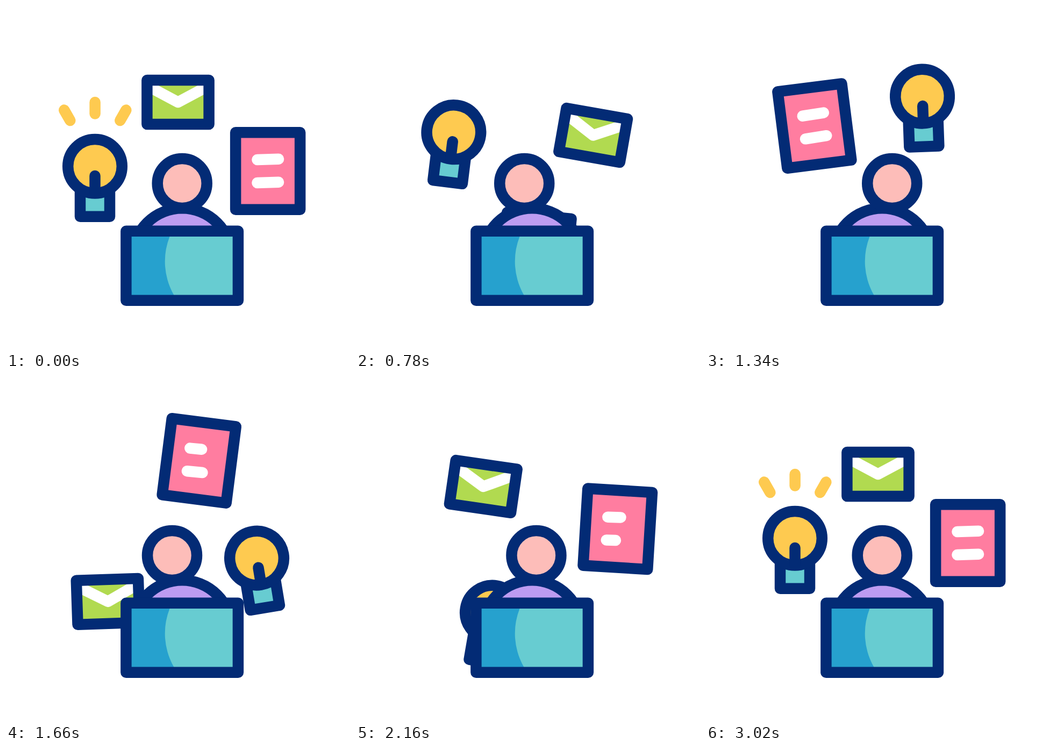
Animation, 640 px wide and 640 px high, one loop 3.42 s. Source, as an HTML page:

```html
<!DOCTYPE html>
<html lang="en">
<head>
<meta charset="utf-8">
<title>Juggling tasks</title>
<style>
  html, body { margin: 0; width: 100%; height: 100%; overflow: hidden; background: #fff; }
  svg { display: block; width: 100vw; height: 100vh; }
  .o { stroke: #032b75; }
  .w { stroke: #fff; }
  .y { stroke: #feca50; }
</style>
</head>
<body>
<svg viewBox="0 0 640 640" fill="none" stroke-width="20.5" stroke-linejoin="round">
  <g stroke-linecap="round">
    <path class="y ray" pathLength="1" d="M119.3 213L108.2 193.6"/>
    <path class="y ray" pathLength="1" d="M165.6 200.5V179"/>
    <path class="y ray" pathLength="1" d="M212.3 213L223.4 193.6"/>
  </g>

  <g id="mail">
    <rect x="-57.6" y="-41" width="115.2" height="82" fill="#b1da50"/>
    <path class="w" d="M-57.6 -30.8L0 0L57.6 -30.8"/>
    <rect class="o" x="-57.6" y="-41" width="115.2" height="82"/>
  </g>

  <g id="page" stroke-linecap="round">
    <rect class="o" x="-60" y="-71.7" width="120" height="143.4" fill="#ff7da0"/>
    <path class="w row" pathLength="1" d="M-19.7 -21L19.9 -22.2"/>
    <path class="w row" pathLength="1" d="M-19.7 22L19.9 20.8"/>
  </g>

  <g id="bulb" class="o" stroke-linecap="round">
    <rect x="-27.5" y="22" width="55" height="49.7" fill="#67ccd1"/>
    <circle cy="-21.8" r="50.3" fill="#feca50"/>
    <path d="M0 -4V26"/>
  </g>

  <path class="o" d="M235.7 468.3A92 92 0 0 1 419.7 468.3" fill="#bd9cf1"/>
  <circle id="head" class="o" cx="327.7" cy="330" r="46" fill="#fdbdb9"/>

  <rect x="223.4" y="418.8" width="208.5" height="129" fill="#67ccd1"/>
  <path d="M224 429H304.5A126 126 0 0 0 312.5 538H224Z" fill="#26a1ce"/>
  <rect class="o" x="223.4" y="418.8" width="208.5" height="129"/>
</svg>
<script>
const LOOP = 3420, TURN = 2400, RING = 154.5;
const get = id => document.getElementById(id);
const rays = document.querySelectorAll('.ray');
const rows = document.querySelectorAll('.row');

// start delay, start angle, centre offset from the ring point, squash of the ring
const items = [
  { el: get('page'), delay: 0, from: 0.55, dx: 12.7, dy: -14.5, squash: 2.5 },
  { el: get('mail'), delay: 200, from: -90, dx: 0, dy: 13.5, squash: 0 },
  { el: get('bulb'), delay: 400, from: 180, dx: 0, dy: 0, squash: 0 }
];

const ease = (t, a, b) => {
  const s = Math.min(1, Math.max(0, (t - a) / (b - a)));
  return s * s * (3 - 2 * s);
};

// eased values, one every 600 ms
const swing = (t, keys) => keys.slice(1).reduce(
  (v, k, i) => v + (k - keys[i]) * ease(t, i * 600, i * 600 + 600), keys[0]);

function trim(el, k) {
  el.setAttribute('stroke-dasharray', `${k} 3`);
  el.setAttribute('visibility', k > 0.001 ? 'visible' : 'hidden');
}

function place({ el, delay, from, dx, dy, squash }, time) {
  const t = time - delay;
  const a = (from + 360 * ease(t, 0, TURN)) * Math.PI / 180;
  const r = RING - squash * Math.sin(2 * a);
  const x = 320 + r * Math.cos(a), y = 320 + r * Math.sin(a);
  const tilt = swing(t, [0, 10, -10, 10, 0]);
  el.setAttribute('transform', `translate(${x} ${y}) rotate(${tilt}) translate(${dx} ${dy})`);
}

function rowLength(t) {
  if (t < 0 || t > TURN) return 1;
  const u = t % 1200;
  return 1 - 0.84 * (ease(u, 200, 700) - ease(u, 700, 1200));
}

function draw(t) {
  items.forEach(item => place(item, t));
  get('head').setAttribute('cx', 327.7 + 25.7 * swing(t, [0, -1, 1, -1, 1, 0]));
  rows.forEach((row, i) => trim(row, rowLength(t - 70 * i)));
  const k = 1 - ease(t, 0, 400) + ease(t, 2800, 3000);
  rays.forEach(ray => trim(ray, k));
}

const start = performance.now();
function tick() {
  draw((performance.now() - start) % LOOP);
  requestAnimationFrame(tick);
}
tick();
</script>
</body>
</html>
```
